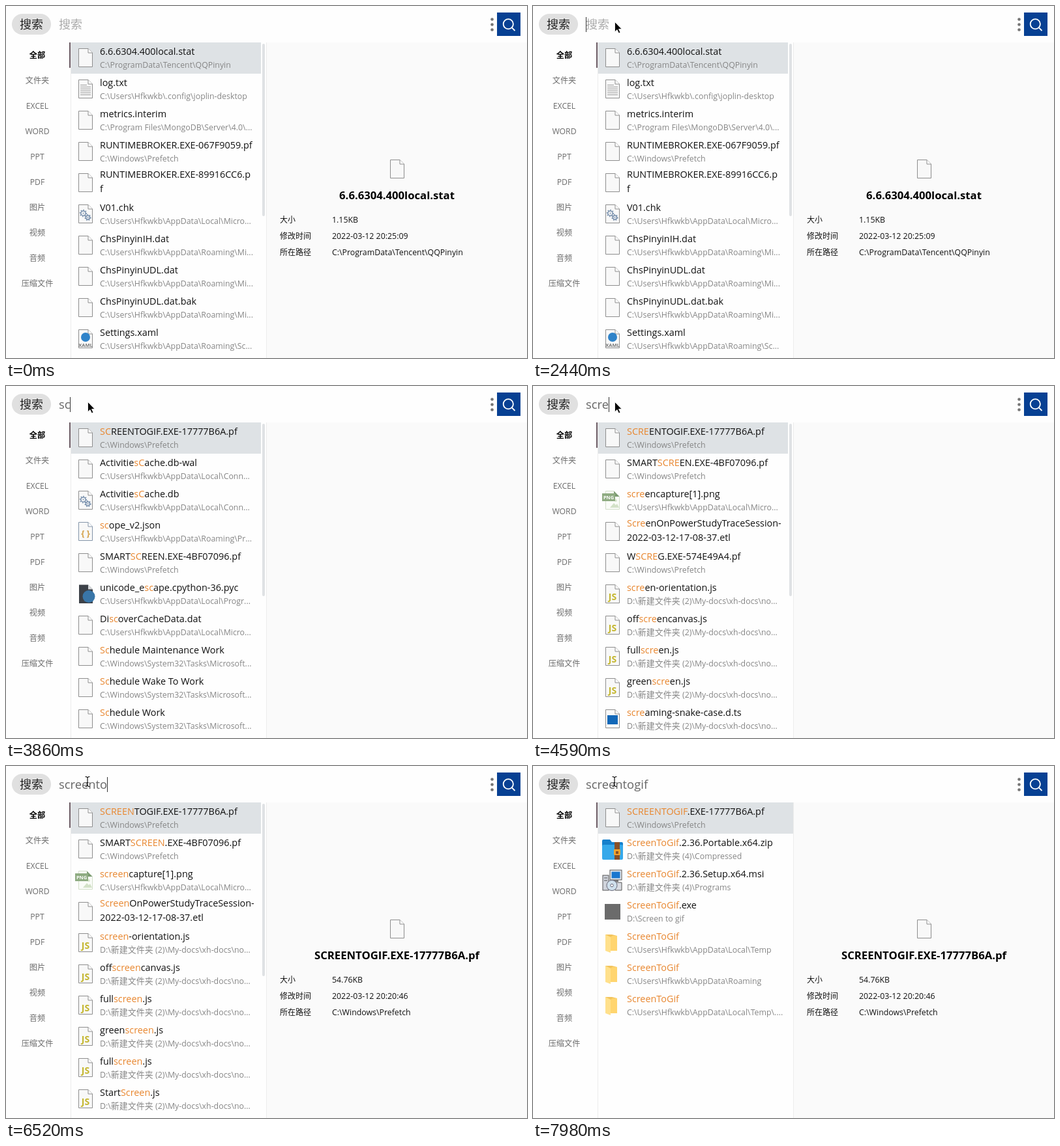
Animation, 799 px wide and 541 px high, one loop 8 s. Source, as an HTML page:

```html
<!DOCTYPE html>
<html lang="zh-CN">
<head>
<meta charset="utf-8">
<title>搜索</title>
<style>
  html, body { margin: 0; width: 100%; height: 100%; overflow: hidden; background: #fefefe; }
  svg { display: block; width: 100vw; height: 100vh; }
  text { font-family: "Open Sans", "Noto Sans CJK SC", "Noto Sans CJK", sans-serif; white-space: pre; }
  .name { font-size: 14.4px; fill: #111; }
  .path { font-size: 12.35px; fill: #868686; }
  .han { font-size: 13px; }
  .hit { fill: #e8862e; }
  .info { font-size: 12.35px; fill: #111; }
  .head { font-size: 16.7px; font-weight: 700; fill: #000; text-anchor: middle; }
  .menu { font-size: 12.2px; fill: #6c6c6c; text-anchor: middle; }
  .menu.on { fill: #000; font-weight: 700; }
  .box { font-size: 18px; }
</style>
</head>
<body>
<svg viewBox="0 0 799 541" xmlns="http://www.w3.org/2000/svg">
  <rect width="799" height="541" fill="#fefefe"/>
  <rect x="400" y="56" width="399" height="485" fill="#fafafa"/>
  <path d="M99.5 56V541M399.5 56V541" stroke="#ececec"/>
  <rect x="9" y="12" width="60" height="32" rx="16" fill="#e0e0e0"/>
  <text class="box" x="21" y="35" fill="#222">搜索</text>
  <text class="box" id="hint" x="81" y="35" fill="#aaa" font-weight="300">搜索</text>
  <text id="query" x="81" y="35" fill="#666" font-size="18.4"></text>
  <path id="caret" stroke="#333"/>
  <g fill="#757575"><circle cx="745.5" cy="20.5" r="2.3"/><circle cx="745.5" cy="28.5" r="2.3"/><circle cx="745.5" cy="36.5" r="2.3"/></g>
  <rect x="753" y="10" width="36" height="36" fill="#074093"/>
  <g fill="none" stroke="#fff" stroke-width="1.8"><circle cx="770.3" cy="27.8" r="7.6"/><path d="M775.7 33.2L780.5 38"/></g>
  <g id="menu"></g>
  <g id="list"></g>
  <rect x="97" y="56" width="2" height="39" fill="#6d5d66"/>
  <g id="detail"></g>
  <path id="arrow" d="M0 0V15.2L3.5 12L6 17.3L8.4 16.2L6 11H10.6Z" fill="#000" stroke="#fff" stroke-width=".8"/>
  <path id="beam" d="M121.5 16.5H123.5L125 18L126.5 16.5H128.5M125 18V30M121.5 31.5H123.5L125 30L126.5 31.5H128.5M123.5 25.5H126.5" fill="none" stroke="#111" stroke-width="1.2"/>
</svg>
<script>
const LOOP = 8000, BLINK = 530;
const $ = id => document.getElementById(id);

// "icon|name|path", or "icon|first line||second line"
const raw = String.raw;
const app = raw`C:\Users\Hfkwkb\AppData` + '\\';
const docs = raw`D:\新建文件夹 (2)\My-docs\xh-docs\no...`;
const pre = raw`C:\Windows\Prefetch`;
const tasks = raw`C:\Windows\System32\Tasks\Microsoft...`;
const prog = 'doc|SCREENTOGIF.EXE-17777B6A.pf|' + pre;
const smart = 'doc|SMARTSCREEN.EXE-4BF07096.pf|' + pre;
const js = (...names) => names.map(n => `js|${n}.js|${docs}`);

const recent = [
  raw`doc|6.6.6304.400local.stat|C:\ProgramData\Tencent\QQPinyin`,
  raw`txt|log.txt|C:\Users\Hfkwkb\.config\joplin-desktop`,
  raw`doc|metrics.interim|C:\Program Files\MongoDB\Server\4.0\...`,
  `doc|RUNTIMEBROKER.EXE-067F9059.pf|${pre}`,
  'doc|RUNTIMEBROKER.EXE-89916CC6.p||f',
  `gear|V01.chk|${app}Local\\Micro...`,
  `doc|ChsPinyinIH.dat|${app}Roaming\\Mi...`,
  `doc|ChsPinyinUDL.dat|${app}Roaming\\Mi...`,
  `doc|ChsPinyinUDL.dat.bak|${app}Roaming\\Mi...`,
  `xaml|Settings.xaml|${app}Roaming\\Sc...`
];
const broad = [
  prog,
  `doc|ActivitiesCache.db-wal|${app}Local\\Conn...`,
  `gear|ActivitiesCache.db|${app}Local\\Conn...`,
  `json|scope_v2.json|${app}Roaming\\Pr...`,
  smart,
  `py|unicode_escape.cpython-36.pyc|${app}Local\\Progr...`,
  `doc|DiscoverCacheData.dat|${app}Local\\Micro...`,
  `doc|Schedule Maintenance Work|${tasks}`,
  `doc|Schedule Wake To Work|${tasks}`,
  `doc|Schedule Work|${tasks}`
];
const shared = [
  prog, smart,
  `png|screencapture[1].png|${app}Local\\Micro...`,
  'doc|ScreenOnPowerStudyTraceSession-||2022-03-12-17-08-37.etl'
];
const scripts = js('screen-orientation', 'offscreencanvas', 'fullscreen', 'greenscreen');
const wide = ['doc|WSCREG.EXE-574E49A4.pf|' + pre, ...scripts, `clip|screaming-snake-case.d.ts|${docs}`];
const mixed = [prog, smart, ...wide, ...shared.slice(2)];
const closer = [...shared, ...wide];
const narrow = [...shared, ...scripts, ...js('fullscreen', 'StartScreen')];
const final = [
  prog,
  raw`zip|ScreenToGif.2.36.Portable.x64.zip|D:\新建文件夹 (4)\Compressed`,
  raw`msi|ScreenToGif.2.36.Setup.x64.msi|D:\新建文件夹 (4)\Programs`,
  raw`app|ScreenToGif.exe|D:\Screen to gif`,
  `dir|ScreenToGif|${app}Local\\Temp`,
  `dir|ScreenToGif|${app}Roaming`,
  `dir|ScreenToGif|${app}Local\\Temp\\....`
];

// Timelines: [start, value...]
const word = 'screentogif';
const keys = [0, 3250, 3450, 4190, 4390, 5190, 5740, 6400, 6520, 6990, 7190, 7450].map((t, i) => [t, word.slice(0, i)]);
const lists = [
  [0, 0, recent], [3450, 1, broad], [3860, 2, broad], [4390, 3, mixed], [4590, 4, closer],
  [5390, 5, narrow], [5920, 6, narrow], [6590, 7, final], [6720, 8, final],
  [7190, 9, final], [7390, 10, final], [7590, 11, final]
];
const first = ['6.6.6304.400local.stat', '1.15KB', '2022-03-12 20:25:09', raw`C:\ProgramData\Tencent\QQPinyin`];
const found = ['SCREENTOGIF.EXE-17777B6A.pf', '54.76KB', '2022-03-12 20:20:46', pre];
const details = [
  [0, first], [3450, null], [4060, found], [4390, null], [4790, found], [5390, null],
  [5590, found], [5920, null], [6130, found], [6590, null], [6930, found], [7190, null], [7790, found]
];
const idleBlinks = [260, 810, 1340, 1870, 2440, 2970];
const at = (line, t) => line.filter(e => e[0] <= t).pop();

const rect = (x, y, w, h, fill, more = '') => `<rect x="${x}" y="${y}" width="${w}" height="${h}" fill="${fill}" ${more}/>`;
const path = (d, fill, stroke = 'none', more = '') => `<path d="${d}" fill="${fill}" stroke="${stroke}" ${more}/>`;
const disc = (x, y, r, fill, more = '') => `<circle cx="${x}" cy="${y}" r="${r}" fill="${fill}" ${more}/>`;
const text = (cls, x, y, s, more = '') => `<text class="${cls}" x="${x}" y="${y}" ${more}>${s}</text>`;
const label = (x, y, size, fill, s) => text('', x, y, s, `font-size="${size}" font-weight="700" fill="${fill}" text-anchor="middle"`);
const sheet = (stroke = '#8d8d8d', fill = '#f8f8f8') =>
  path('M1.5 .5H16L22.5 7V28.5H1.5Z', fill, stroke) + path('M16 .5V7H22.5', '#fff', stroke);
const cog = (x, y, r) => disc(x, y, r, 'none', 'stroke="#7890ad" stroke-width="1.5"') +
  disc(x, y, r + 1.3, 'none', 'stroke="#7890ad" stroke-width="1.6" stroke-dasharray="1.7 2"') + disc(x, y, 1, '#7890ad');

const icons = {
  doc: () => sheet(),
  txt: () => sheet() + path('M4 8.5H14M4 11.5H20M4 14.5H20M4 17.5H20M4 20.5H20M4 23.5H20', 'none', '#999'),
  gear: () => sheet() + cog(8.5, 13.5, 3.6) + cog(15.5, 20, 3),
  json: () => sheet('#8394a8') + label(12, 22, 13, '#d5a148', '{ }'),
  js: () => sheet() + label(12, 23.5, 14, '#c4b62e', 'JS'),
  py: () => path('M2 .5H16L23 7.5V29H2Z', '#3c4148') + path('M16 .5V7.5H23Z', '#d7d9dc') + disc(17, 18.5, 9.5, '#3976a8'),
  clip: () => sheet() + rect(4, 9, 16, 14, '#1268b8'),
  xaml: () => sheet() + disc(12, 12, 7, '#2f83c9') + label(12, 27, 7.5, '#777', 'XAML'),
  png: () => path('M1.5 .5H14L22.5 9V28.5H1.5Z', '#fafcf8', '#d3dfca') + path('M14 .5V9H22.5Z', '#7b9a70') +
    path('M8 26L14 19L17 22L19 20L22 26Z', '#d3e2c8') + disc(17, 15, 2, '#d9e6cf') +
    rect(-4, 4, 20, 12, '#8fac82') + label(6, 12.8, 7.5, '#fff', 'PNG'),
  dir: () => path('M1 2H11L19 4V27H1Z', '#f2c45c') + path('M1 2L9 6V30L1 27Z', '#ffe08c') + path('M9 6L12 4H19V27H9Z', '#ffd56f'),
  zip: () => path('M-4 2Q-4 0 -2 0H8L11 4H26Q28 4 28 6V29H-4Z', '#1680cc') + rect(-4, 8, 32, 23, '#36a9ea', 'rx="2"') +
    rect(15, 4, 8, 27, '#885028') + rect(14, 15, 10, 9, '#f1a32d', 'rx="1"') + rect(17, 18, 4, 4, '#885028'),
  msi: () => rect(-3, 7, 9, 23, '#d0d4dc', 'stroke="#555"') + path('M-1 11H4M-1 15H4', 'none', '#555') +
    rect(8, -1, 18, 15, '#e6e8ec', 'stroke="#555"') + rect(10.5, 1.5, 13, 10, '#1976cf') + path('M13 14H21V17H13Z', '#777') +
    path('M16 18H26V30H16Z', '#d9dce2', '#555') + disc(11, 22.5, 8, '#cfe0ec', 'stroke="#667"') + disc(11, 22.5, 2.2, '#fff', 'stroke="#667"'),
  app: () => rect(0, 3, 24, 24, '#6b6b6b')
};

function mark(s, q) {
  const i = q ? s.toLowerCase().indexOf(q) : -1;
  if (i < 0) return s;
  const end = i + q.length;
  return `${s.slice(0, i)}<tspan class="hit">${s.slice(i, end)}</tspan>${s.slice(end)}`;
}

const han = s => s.replace(/[\u4e00-\u9fff]+/g, '<tspan class="han">$&</tspan>');

function row(entry, i, q) {
  const [icon, name, dir, rest] = entry.split('|');
  const y = 56 + 48 * i;
  const lines = rest
    ? text('name', 144, y + 16, mark(name, q)) + text('name', 144, y + 38, rest)
    : text('name', 144, y + 19, mark(name, q)) + text('path', 144, y + 39, han(dir));
  return `<g transform="translate(110 ${y + 9})">${icons[icon]()}</g>${lines}`;
}

function listView([, n, rows]) {
  const scrolls = rows.length > 9;
  return rect(100, 56, scrolls ? 291 : 299, 48, '#dee2e5') +
    (scrolls ? rect(393, 58, 4, 265, '#dfe2e4', 'rx="2"') : '') +
    rows.slice(0, 10).map((r, i) => row(r, i, word.slice(0, n))).join('');
}

function detailView([, d]) {
  if (!d) return '';
  return `<g transform="translate(588 236)">${icons.doc()}</g>` + text('head', 599.5, 297, d[0]) +
    ['大小', '修改时间', '所在路径'].map((s, i) =>
      text('info', 420, 333 + 25 * i, s, 'style="font-size:12px"') + text('info', 500, 333 + 25 * i, d[i + 1])).join('');
}

$('menu').innerHTML = ['全部', '文件夹', 'EXCEL', 'WORD', 'PPT', 'PDF', '图片', '视频', '音频', '压缩文件']
  .map((s, i) => text(i ? 'menu' : 'menu on', 48, 79.7 + 39 * i, s)).join('');

const show = (id, on) => $(id).setAttribute('visibility', on ? 'visible' : 'hidden');
const bezier = (u, a, b, c, d) => { const v = 1 - u; return v*v*v*a + 3*v*v*u*b + 3*v*u*u*c + u*u*u*d; };
const shown = {};
function update(id, entry, view) {
  if (shown[id] === entry) return;
  shown[id] = entry;
  $(id).innerHTML = view(entry);
}

function draw(t) {
  const [pressed, typed] = at(keys, t);
  const query = $('query');
  if (query.textContent !== typed) query.textContent = typed;
  show('hint', !typed);
  const x = typed ? Math.floor(81 + query.getComputedTextLength()) + .5 : 81.5;
  $('caret').setAttribute('d', `M${x} 17V40`);
  const lit = typed ? Math.floor((t - pressed) / BLINK) % 2 === 0 : idleBlinks.filter(b => b <= t).length % 2 === 1;
  show('caret', lit);

  update('list', at(lists, t), listView);
  update('detail', at(details, t), detailView);

  // The pointer travels in 70 ms hops
  const hop = Math.min(9, Math.max(0, Math.floor((t - 1810) / 70)));
  const u = 1 - (1 - hop / 9) ** 1.6;
  $('arrow').setAttribute('transform', `translate(${bezier(u, 222, 60, 0, 125.5)} ${bezier(u, 450, 330, 40, 24.5)})`);
  show('arrow', t >= 1810 && t < 5120);
  show('beam', t >= 5120);
}

const start = performance.now();
function tick() {
  draw((performance.now() - start) % LOOP);
  requestAnimationFrame(tick);
}
tick();
</script>
</body>
</html>
```
